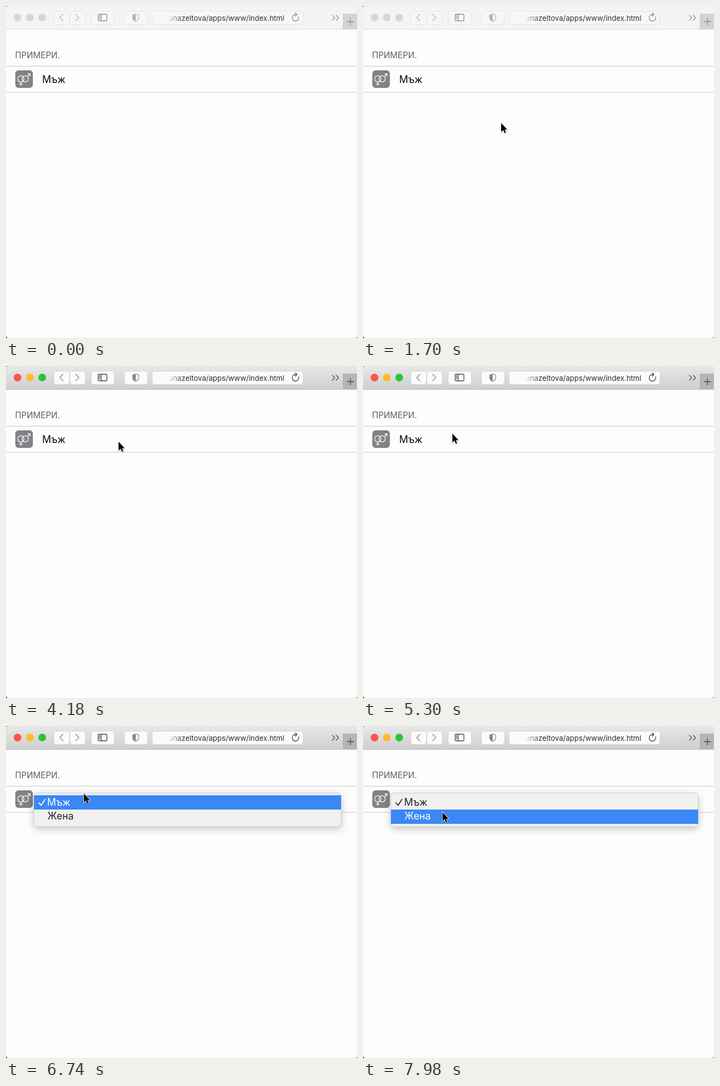
Recreate the animation shown at these times as an HTML page. Size 640 by 604 pixels, loop 8 s.

```html
<!DOCTYPE html>
<html lang="bg">
<head>
<meta charset="utf-8">
<title>Select menu</title>
<style>
html, body { margin: 0; width: 100%; height: 100%; overflow: hidden; background: #64160f; }
svg {
  display: block; width: 640px; height: 604px;
  font-family: Inter, Roboto, "Noto Sans", sans-serif;
  animation: focus 8s step-end infinite;
}
.icon { fill: none; stroke: var(--icon); stroke-width: 1.3; stroke-linecap: round; stroke-linejoin: round; }
.faint { stroke: var(--faint); }
.button { fill: var(--button); stroke: var(--edge); }
.menu { animation: open 8s step-end infinite; }
.menu-box { filter: drop-shadow(0 4px 7px rgba(0, 0, 0, .22)); }
.option { font-size: 18px; }
.bar { fill: #3b87f6; animation: bar 8s step-end infinite; }
.man { color: #fff; animation: man 8s step-end infinite; }
.woman { color: #262626; animation: woman 8s step-end infinite; }
.man, .woman { fill: currentColor; }
.cursor { animation: move 8s linear infinite, appear 8s step-end infinite; filter: drop-shadow(0 1px 1px rgba(0, 0, 0, .3)); }

/* Window is in the background, then gains focus */
@keyframes focus {
  0% {
    --top: #f4f4f4; --bottom: #f4f4f4; --rule: #d9d9d9; --button: #f7f7f7; --edge: #e6e6e6;
    --red: #d6d6d6; --amber: #d6d6d6; --green: #d6d6d6;
    --icon: #8e8e8e; --faint: #b4b4b4; --url: #343434; --tab: #d3d3d3;
  }
  46.25%, 100% {
    --top: #e8e8e8; --bottom: #cfcfcf; --rule: #b3b3b3; --button: #fbfbfb; --edge: #d9d9d9;
    --red: #fc5248; --amber: #fdbb2c; --green: #27c732;
    --icon: #454545; --faint: #878787; --url: #2c2c2c; --tab: #b5b5b5;
  }
}
@keyframes open { 0% { visibility: hidden; } 71%, 100% { visibility: visible; } }
@keyframes bar { 0% { transform: none; } 92.5%, 100% { transform: translateY(26px); } }
@keyframes man { 0% { color: #fff; } 92.5%, 100% { color: #262626; } }
@keyframes woman { 0% { color: #262626; } 92.5%, 100% { color: #fff; } }
@keyframes appear { 0% { visibility: hidden; } 5%, 100% { visibility: visible; } }
@keyframes move {
  0%, 5% { transform: translate(330px, 547px); }
  10.4% { transform: translate(285px, 298px); }
  20% { transform: translate(262px, 262px); }
  21.25%, 22.4% { transform: translate(252px, 213px); }
  31% { transform: translate(236px, 168px); }
  40% { transform: translate(224px, 140px); }
  52% { transform: translate(206px, 138px); }
  66.25% { transform: translate(163px, 123px); }
  71%, 84.5% { transform: translate(142px, 123px); }
  89.5%, 90.4% { transform: translate(145px, 143px); }
  96%, 100% { transform: translate(145px, 157px); }
}
</style>
</head>
<body>
<svg viewBox="0 0 640 604">
  <defs>
    <linearGradient id="chrome" x2="0" y2="1">
      <stop stop-color="var(--top)"/>
      <stop offset="1" stop-color="var(--bottom)"/>
    </linearGradient>
    <linearGradient id="fade" gradientUnits="userSpaceOnUse" x1="293" x2="324">
      <stop stop-color="#fff" stop-opacity="0"/>
      <stop offset="1" stop-color="#fff"/>
    </linearGradient>
    <mask id="urlMask"><rect x="266" y="8" width="250" height="28" fill="url(#fade)"/></mask>
    <clipPath id="window"><path d="M4 0H640V602L638 604H5Q0 604 0 599V4Q0 0 4 0Z"/></clipPath>
  </defs>

  <g clip-path="url(#window)">
    <rect width="640" height="604" fill="#fdfdfe"/>

    <rect width="640" height="42" fill="url(#chrome)"/>
    <rect y="42" width="640" height="1" fill="var(--rule)"/>
    <circle cx="21" cy="21" r="7" fill="var(--red)"/>
    <circle cx="43.5" cy="21" r="7" fill="var(--amber)"/>
    <circle cx="66" cy="21" r="7" fill="var(--green)"/>

    <g class="button">
      <rect x="87.5" y="9.5" width="28" height="24" rx="4.5"/>
      <rect x="116.5" y="9.5" width="28" height="24" rx="4.5"/>
      <rect x="155.5" y="9.5" width="42" height="24" rx="4.5"/>
      <rect x="216" y="9.5" width="42" height="24" rx="4.5"/>
      <rect x="266.5" y="9.5" width="275" height="24" rx="4.5"/>
    </g>
    <path class="icon faint" d="M104 15l-6 6 6 6M127 15l6 6-6 6"/>
    <g class="icon">
      <rect x="168" y="15" width="16" height="12" rx="1.5"/>
      <path d="M173.5 15v12M170 18h1.5M170 20.5h1.5M170 23h1.5"/>
      <path d="M533.5 19.5A6 6 0 1 1 528 15.5h2M527.5 12.5l3 3-3 3"/>
      <path d="M595 17l4.5 4.5-4.5 4.5M602 17l4.5 4.5-4.5 4.5"/>
    </g>
    <path class="icon faint" d="M236.5 14.5l5.5 2v5q0 4-5.5 6.5q-5.5-2.5-5.5-6.5v-5z"/>
    <path d="M236.5 14.5v13.5q-5.5-2.5-5.5-6.5v-5z" fill="var(--faint)"/>
    <text x="507.5" y="27" text-anchor="end" font-size="13.3" fill="var(--url)" mask="url(#urlMask)">unazeltova/apps/www/index.html</text>
    <rect x="614" y="14" width="26" height="28" fill="var(--tab)"/>
    <path class="icon" d="M622 28.5h12M628 22.5v12"/>

    <text x="16.5" y="95" font-size="15.4" fill="#5f5f62">ПРИМЕРИ.</text>
    <path d="M0 109.5H640M0 157H640" stroke="#c6c6c8"/>
    <rect x="17" y="117" width="32" height="32" rx="6" fill="#828286"/>
    <g fill="none" stroke="#fafafa" stroke-width="1.3">
      <circle cx="27" cy="132.5" r="5.7"/>
      <circle cx="35" cy="132.5" r="5.7"/>
      <path d="M27 138.2v7M23.5 141.8h7M39 128.5l5-5M39.5 123.5h4.5v4.5"/>
    </g>
    <text class="option" x="66" y="140" fill="#0a0a0a">Мъж</text>

    <g class="menu">
      <rect class="menu-box" x="51" y="122" width="560" height="61" rx="5" fill="#f0f0ee" stroke="#d0d0d0"/>
      <rect class="bar" x="51" y="126" width="560" height="26"/>
      <g class="man">
        <path d="M60 139.5l4 5 7-11" fill="none" stroke="currentColor" stroke-width="1.7" stroke-linecap="round" stroke-linejoin="round"/>
        <text class="option" x="75" y="144.5">Мъж</text>
      </g>
      <text class="option woman" x="75.5" y="170">Жена</text>
    </g>

    <path class="cursor" d="M0 0V16L3.7 12.6 6.2 18.3 8.6 17.2 6.2 11.8H11Z" fill="#000" stroke="#fff" stroke-width="1.6" paint-order="stroke"/>
  </g>
</svg>
</body>
</html>
```
